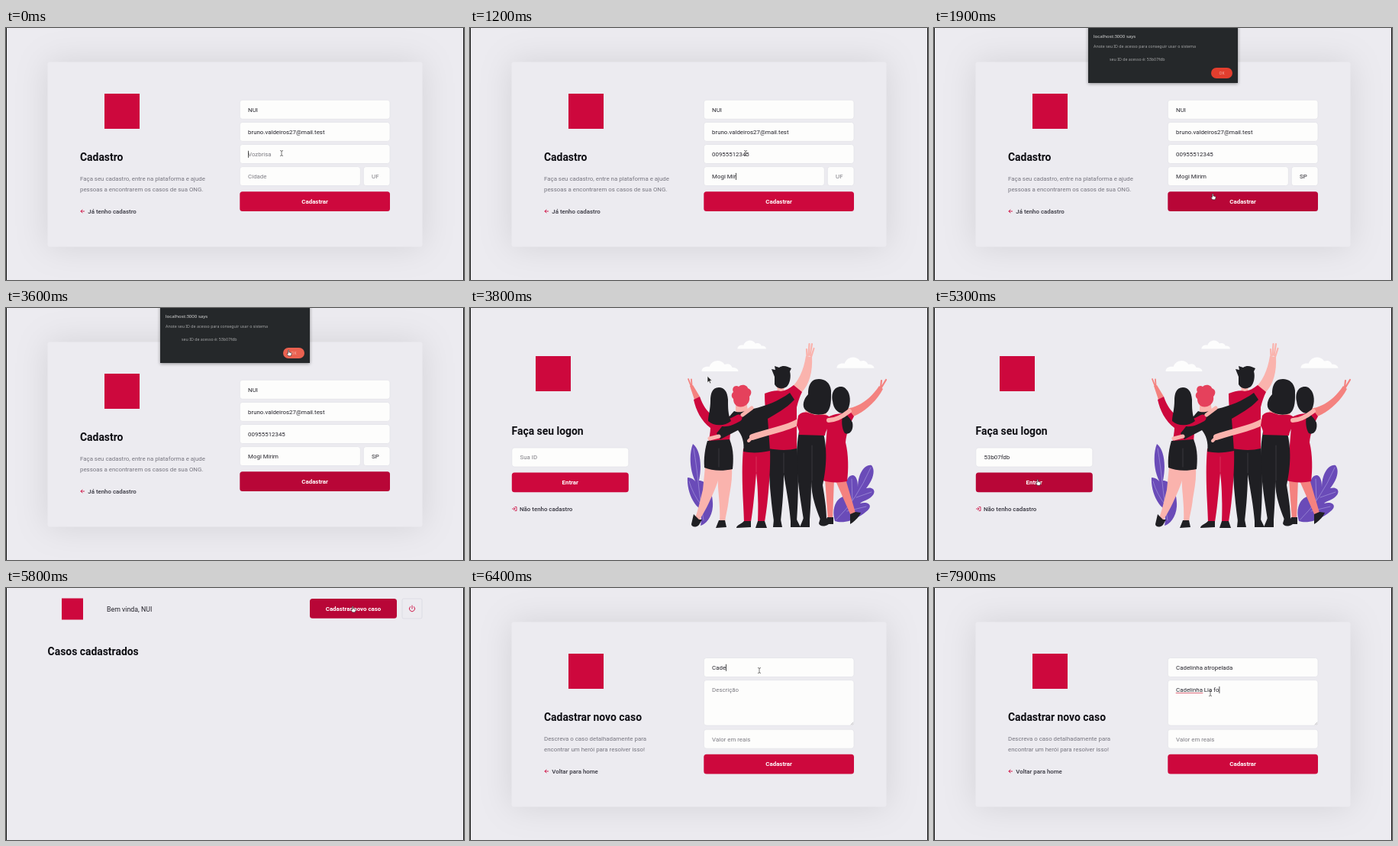
An HTML page for the animation above (8000 ms loop, 600 by 330 pixels).

```html
<!DOCTYPE html>
<html lang="pt">
<head>
<meta charset="utf-8">
<style>
html, body { margin: 0; width: 600px; height: 330px; overflow: hidden; background: #ecebf0; }
svg { display: block; font: 7.88px Roboto, sans-serif; }
.h { font-size: 13.9px; font-weight: 700; fill: #0d0d12; }
.p { fill: #76757f; }
.l { font-weight: 500; fill: #35343e; }
.b { font-weight: 700; fill: #fff; text-anchor: middle; }
.d { font-family: "Noto Sans", sans-serif; }
.card { fill: #ecebf0; filter: drop-shadow(0 0 22px rgba(0, 0, 0, .1)); }
.dialog { fill: #25282a; filter: drop-shadow(0 1px 2px rgba(0, 0, 0, .4)); }
</style>
</head>
<body>
<svg id="stage" width="600" height="330" viewBox="0 0 600 330"></svg>
<script>
const RED = '#cd083d', DARK_RED = '#b80637', SKIN = '#f4827f', PALE = '#fab3ad', INK = '#1f1f23', PURPLE = '#6a4bb8';
const LOOP = 8000, STEP = 100;
const ORG = 'NUI', EMAIL = 'bruno.valdeiros27@mail.test', PHONE = '00955512345', ID = '53b07fdb';
const stage = document.getElementById('stage');
const pen = document.createElement('canvas').getContext('2d');
pen.font = '7.88px Roboto, sans-serif';

// pointer stops: time, x, y
const stops = [[0, 361, 164], [1400, 361, 164], [1700, 366, 221], [2800, 366, 221], [3500, 371, 59],
  [3700, 371, 59], [4100, 139, 196], [4900, 139, 196], [5200, 136.5, 228.5], [5400, 136.5, 228.5],
  [5800, 455, 28], [6100, 379, 108], [7000, 379, 108], [7200, 362, 138], [LOOP, 362, 138]];

let mouse, pointer;

const between = (t, a, b) => t >= a && t < b;
const progress = (t, a, b) => Math.min(1, Math.max(0, (t - a) / (b - a)));
const typed = (s, t, a, b) => s.slice(0, Math.round(s.length * progress(t, a, b)));

function mouseAt(t) {
  const i = stops.findIndex(s => s[0] > t);
  const [a, x, y] = stops[i - 1], [b, u, v] = stops[i];
  const k = progress(t, a, b);
  return [x + (u - x) * k, y + (v - y) * k];
}

function over(x, y, w, h, kind) {
  const hit = between(mouse[0], x, x + w) && between(mouse[1], y, y + h);
  if (hit) pointer = kind;
  return hit;
}

const text = (x, y, s, cls = '', more = '') => `<text x="${x}" y="${y}" class="${cls}" ${more}>${s}</text>`;
const rect = (x, y, w, h, fill, more = '') =>
  `<rect x="${x}" y="${y}" width="${w}" height="${h}" fill="${fill}" ${more}/>`;
const shape = (fill, d) => `<path fill="${fill}" d="${d}"/>`;
const line = (color, width, d) =>
  `<path fill="none" stroke="${color}" stroke-width="${width}" stroke-linecap="round" stroke-linejoin="round" d="${d}"/>`;
const logo = (x, y, size) => rect(x, y, size, size, RED);

// wrong: the part of the value marked by the spelling checker
function field(x, y, w, h, hint, value = '', focused = false, wrong = '') {
  over(x, y, w, h, 'beam');
  const base = y + 15.3, tx = x + 10.8;
  let out = rect(x, y, w, h, '#fdfdfc', 'rx="3.5" stroke="#dddde5" stroke-width=".6"');
  out += value ? text(tx, base, value, '', 'fill="#24232b"') : text(tx, base, hint, '', 'fill="#7c7b82"');
  if (wrong) out += line('#d9485c', .8, `M${tx} ${base + 1.6}h${pen.measureText(wrong).width}`);
  if (focused) out += rect(tx + pen.measureText(value).width, base - 7, .8, 9, '#222');
  return out;
}

function button(x, y, w, label, held = false) {
  const hot = over(x, y, w, 25.8, 'hand') || held;
  return rect(x, y, w, 25.8, hot ? DARK_RED : RED, 'rx="3.5"') + text(x + w / 2, y + 15.6, label, 'b');
}

function card(title, first, second, back) {
  return rect(54.5, 44.5, 491, 242, '#ecebf0', 'class="card" rx="3"') + logo(129, 86, 46) +
    text(97, 173.6, title, 'h') + text(97, 200, first, 'p') + text(97, 214, second, 'p') +
    line(RED, .9, 'M102.5 240H98m2-2l-2 2l2 2') + text(107.3, 242.6, back, 'l');
}

function signUp(t) {
  const asking = t >= 1900;
  const city = typed('Mogi Mirim', t, 700, 1300), uf = typed('SP', t, 1300, 1500);
  const out = card('Cadastro', 'Faça seu cadastro, entre na plataforma e ajude',
    'pessoas a encontrarem os casos de sua ONG.', 'Já tenho cadastro') +
    field(306.3, 94.3, 196.7, 25, 'Nome da ONG', ORG) +
    field(306.3, 123.4, 196.7, 25, 'E-mail', EMAIL) +
    field(306.3, 152.5, 196.7, 25, 'Vozbrisa', typed(PHONE, t, 0, 600), t < 700) +
    field(306.3, 181.6, 158, 25, 'Cidade', city, between(t, 700, 1300)) +
    field(468.3, 181.6, 34.7, 25, 'UF', uf, between(t, 1300, 1700)) +
    button(306.3, 214.2, 196.7, 'Cadastrar', asking);
  return asking ? out + dialog() : out;
}

function dialog() {
  const hot = over(363, 52, 28, 14, 'hand');
  return rect(202, -4, 196, 76, '', 'class="dialog"') +
    text(209, 13, 'localhost:3000 says', 'd', 'font-size="6.1" fill="#dcdcdc"') +
    text(209, 25.6, 'Anote seu ID de acesso para conseguir usar o sistema', 'd', 'font-size="5.3" fill="#a5a6a7"') +
    text(230, 42.8, 'seu ID de acesso é: ' + ID, 'd', 'font-size="5.3" fill="#a5a6a7"') +
    rect(363, 52, 28, 14, hot ? '#ea6150' : '#e23e2e', 'rx="7"') +
    text(377, 60.9, 'OK', 'd', 'font-size="5" fill="#f5b3a8" text-anchor="middle"');
}

function logOn(t) {
  const id = typed(ID, t, 4100, 4900), focused = between(t, 4100, 5100);
  return logo(86, 63, 46) + text(54.6, 166, 'Faça seu logon', 'h') +
    field(54.8, 183, 153, 25, 'Sua ID', id, focused, focused ? id : '') +
    button(54.8, 215.5, 153, 'Entrar') +
    line(RED, .8, 'M55.5 263H59m-1.5-1.5l1.5 1.5l-1.5 1.5M59 260.5h2v5h-2') +
    text(65, 265.6, 'Não tenho cadastro', 'l') + crowd;
}

function profile() {
  return logo(73, 13.5, 28) + text(132, 30.5, 'Bem vinda, ' + ORG, '', 'font-size="8.8" fill="#24232b"') +
    button(398, 14, 114, 'Cadastrar novo caso') +
    rect(519, 14, 26, 26, 'none', 'rx="2" stroke="#d5d4de" stroke-width=".6"') +
    line(RED, .9, 'M532 23v4M529.5 24.5a3.6 3.6 0 1 0 5 0') +
    text(54.6, 88, 'Casos cadastrados', 'h');
}

function newCase(t) {
  const title = typed('Cadelinha atropelada', t, 6200, 7100), story = typed('Cadelinha Lia fo', t, 7200, 7900);
  return card('Cadastrar novo caso', 'Descreva o caso detalhadamente para',
    'encontrar um herói para resolver isso!', 'Voltar para home') +
    field(306.3, 91.5, 196.7, 25, 'Título do caso', title, between(t, 6100, 7200)) +
    field(306.3, 120.6, 196.7, 59.4, 'Descrição', story, t >= 7200, story.length > 9 ? 'Cadelinha' : '') +
    line('#9a99a2', .6, 'M499 179l3-3m-1.2 3l1.2-1.2') +
    field(306.3, 185.2, 196.7, 25, 'Valor em reais') +
    button(306.3, 217.8, 196.7, 'Cadastrar');
}

const cloud = (x, y, s) => `<g transform="translate(${x} ${y}) scale(${s})">` +
  shape('#fdfdfd', 'M0 14C0 9 5 7 10 8C13 -1 25 -3 30 5C36 3 39 6 40 9C45 9 48 11 48 14Z') + '</g>';

const plants =
  shape(PURPLE, 'M292 178C302 186 304 206 300 226C309 226 319 238 318 260C317 274 309 283 302 285C304 274 302 268 300 262C290 254 284 236 285 222C291 222 295 226 297 230C287 214 287 190 292 178Z') +
  shape(PURPLE, 'M478 279C473 262 480 248 492 246C490 232 494 218 502 219C508 221 508 231 508 235C508 219 516 204 526 206C532 213 527 227 519 236C530 233 533 242 525 248C518 253 513 253 511 256C521 253 528 258 521 265C511 274 492 284 478 279Z') +
  line('#a595dc', .7, 'M293 184Q297 208 299 228T306 278M287 227Q292 244 303 258M480 277Q506 252 525 209M500 224L501 252M526 241L506 248M519 260L494 266');

const first =
  shape(SKIN, 'M288 102L292 101L301 116L294 120Z') + line(SKIN, 1.8, 'M289.5 102L286 93M290.5 101L290 93.5') +
  shape(PALE, 'M308 208L328 211C326 228 319 242 313 255C309 264 303 273 300 279L295 275C299 264 302 250 305 238Z') +
  shape(PALE, 'M324 211L343 210C344 224 341 238 339 250C338 262 335 271 334 280H327C328 265 326 247 325 235Z') +
  shape(INK, 'M293 270L300 277L304 277L300 284C296 288 290 287 290 283ZM326 278H334L336 287L322 288Z') +
  shape(RED, 'M293 120L301 116C305 128 311 136 317 140L341 142C343 155 340 166 340 180H312C313 171 315 163 315 157C303 148 296 134 293 120Z') +
  shape(INK, 'M311 174L340 172C346 186 345 200 344 211C330 214 316 213 307 209C306 196 308 184 311 174Z');

const second =
  shape(RED, 'M358 184H393C394 212 391 250 386 280H377C378 255 377 232 375 216C373 240 371 262 368 280H359C358 250 355 218 358 184Z') +
  shape(INK, 'M359 279H368V287L349 288C349 284 356 283 359 279ZM377 279H386L389 288H374Z') +
  shape(PALE, 'M348 120H362L364 135C358 140 351 139 348 135Z') +
  shape(INK, 'M346 135C354 139 364 133 371 132C388 128 404 122 419 111L425 120C414 132 400 139 390 145L393 187C380 190 368 190 358 188C360 176 356 166 351 160L328 172L323 164C331 155 338 143 346 135Z') +
  shape('#e5415c', 'M345 110C342 104 348 100 352 103C356 99 363 101 364 105C370 107 369 113 366 116C367 122 364 127 358 129C350 131 345 126 345 119C342 117 342 112 345 110Z');

const third =
  shape(PALE, 'M419 106C430 97 437 82 440 63L448 64C449 83 445 100 434 111Z') +
  line(PALE, 2.2, 'M441.5 64L441 54M443.5 62L444.5 47M445.5 62L448 47M447 64L450.5 53') +
  shape(INK, 'M391 180H428C431 215 430 250 428 279H420C418 256 414 236 411 218C411 240 409 260 407 279H398C393 245 391 212 391 180Z') +
  shape(INK, 'M398 277H407L409 287H397ZM420 277H428L433 287H420Z') +
  line(PALE, 9, 'M407 98L407 108') +
  shape(RED, 'M386 112C394 109 402 107 407 109C414 108 419 105 424 101L435 110C432 116 430 122 428 130V184C416 187 402 186 391 184C391 160 386 138 386 112Z') +
  shape(INK, 'M399 90L395 80L400 81L399 76L405 78C411 74 416 77 421 79L419 83C421 90 419 99 415 103C409 107 402 106 399 100Z');

const fourth =
  shape(INK, 'M431 162L463 164C469 188 466 213 462 232C465 250 467 264 467 277H459C452 260 447 244 447 226C447 246 446 263 445 277H437C431 240 424 196 431 162Z') +
  shape(INK, 'M437 275H445V287H432ZM459 275H467L470 283C464 287 458 286 457 282Z') +
  line(PALE, 8, 'M435 146C420 157 396 160 370 169') + line(PALE, 4, 'M371 168L365 174') +
  shape(PALE, 'M440 132L466 134L468 150L436 150Z') +
  shape(RED, 'M430 141C437 133 444 138 452 140C460 140 468 138 472 144C473 154 466 158 465 167L431 166C432 162 430 158 428 154Z') +
  shape(INK, 'M457 93C445 93 443 104 443 113C437 119 434 129 440 134C447 140 458 141 466 138C474 133 473 118 473 108C472 98 465 93 457 93Z');

const fifth =
  shape(SKIN, 'M492 132C508 131 525 119 536 102L541 106C532 123 517 136 502 142Z') +
  line(SKIN, 2.2, 'M538 104L539 95M539 104L545 94') +
  shape(SKIN, 'M465 224H477L475 278H469ZM478 224H492L505 268L499 272Z') +
  shape(INK, 'M468 274H476V283H464ZM498 270L505 267L512 268C509 275 503 280 498 283Z') +
  shape(RED, 'M469 143C478 137 488 140 497 134L503 142C497 152 493 165 492 176C496 192 496 212 494 227C484 229 472 229 462 226C465 196 467 166 469 143Z') +
  shape(INK, 'M486 103C476 103 473 113 475 122C476 132 482 138 489 138C486 147 487 158 491 164C498 167 503 159 501 150C498 143 493 142 493 136C499 128 499 116 495 109C492 105 490 103 486 103Z');

const arms =
  line(RED, 9, 'M320 146C332 155 343 149 352 144') + line(PALE, 5, 'M357 140L369 131') +
  line(PALE, 5, 'M326 168L314 171') + line(PALE, 6, 'M470 147C478 147 488 142 497 135') +
  shape(INK, 'M326 104C317 104 315 113 315 121C315 133 312 141 312 148C319 155 334 155 342 148C338 140 338 130 338 120C337 109 333 104 326 104Z') +
  line('#55525a', .5, 'M326 184v24M411 190v26M448 180v46') + line('#e5587a', .5, 'M375 195v20');

const crowd = cloud(303.5, 69, 1) + cloud(350.5, 42.5, .78) + cloud(480.5, 64.5, 1.02) +
  plants + first + third + second + fifth + fourth + arms;

function drawPointer() {
  const [x, y] = mouse;
  const looks = {
    beam: line('#444', .7, 'M-1.6-3.5Q0-3.5 0-2.5V2.5Q0 3.5-1.6 3.5M1.6-3.5Q0-3.5 0-2.5M0 2.5Q0 3.5 1.6 3.5'),
    hand: '<path fill="#fff" stroke="#222" stroke-width=".7" transform="scale(.85)" d="M-1.8-4.2q1-1 1.6 0V-1.2L2.6-.6Q4-.2 3.7 1.2L2.8 4.5H-1.3L-3.6 1.2q-.3-1.2 1.8-.4Z"/>',
    arrow: '<path fill="#222" stroke="#fff" stroke-width=".6" d="M-2-4V4.5L0 2.6L1.4 5.5L2.7 4.9L1.4 2.1H4Z"/>'
  };
  return `<g transform="translate(${x} ${y})">${looks[pointer]}</g>`;
}

function draw(t) {
  mouse = mouseAt(t);
  pointer = 'arrow';
  const scene = t < 3700 ? signUp : t < 5400 ? logOn : t < 5900 ? profile : newCase;
  stage.innerHTML = scene(t) + drawPointer() + rect(0, 0, 1, 330, '#151515') + rect(599, 0, 1, 330, '#151515');
}

const start = performance.now();
let shown = -1;
function tick() {
  const t = Math.floor((performance.now() - start) % LOOP / STEP) * STEP;
  if (t !== shown) draw(shown = t);
  requestAnimationFrame(tick);
}
tick();
</script>
</body>
</html>
```
